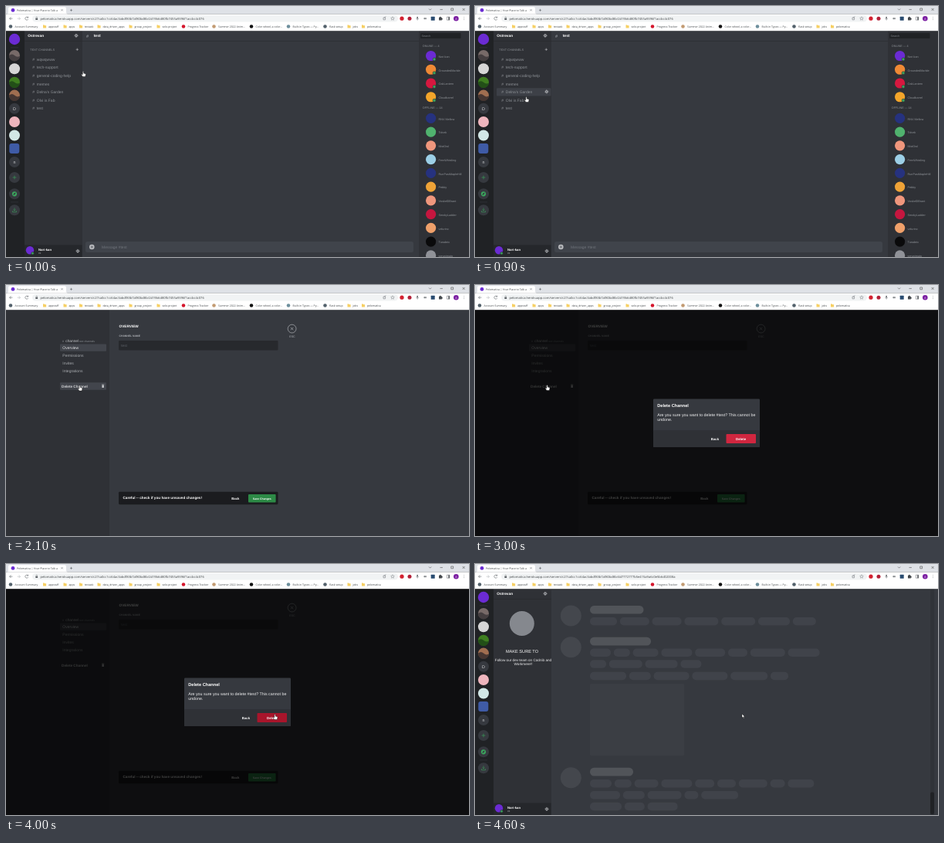
An HTML page that plays this animation: 600x325 px, repeating every 4.7 s.

```html
<!DOCTYPE html>
<html lang="en">
<head>
<meta charset="utf-8">
<title>Channel removal</title>
<style>
html, body { margin: 0; width: 100%; height: 100%; overflow: hidden; background: #36393f; }
svg { display: block; width: 100vw; height: 100vh; }
text { font-family: "Liberation Sans", Arial, sans-serif; text-rendering: geometricPrecision; white-space: pre; }
.ui text { font-family: "Open Sans", "Noto Sans", sans-serif; }
</style>
</head>
<body>
<svg id="stage" viewBox="0 0 600 325" preserveAspectRatio="none"></svg>
<script>
const LOOP = 4700, STEP = 100;
const GREY = '#8e9297', SIDE = '#2f3136', MAIN = '#36393f', DARK = '#202225', GREEN = '#3ba55d';

// Markup helpers
const rect = (x, y, w, h, fill, r = 0, more = '') =>
  `<rect x="${x}" y="${y}" width="${w}" height="${h}" rx="${r}" fill="${fill}" ${more}/>`;
const dot = (x, y, r, fill, more = '') => `<circle cx="${x}" cy="${y}" r="${r}" fill="${fill}" ${more}/>`;
const text = (x, y, s, size, fill, more = '') =>
  `<text x="${x}" y="${y}" font-size="${size}" fill="${fill}" ${more}>${s}</text>`;
const line = (d, color, w = .6, more = '') =>
  `<path d="${d}" fill="none" stroke="${color}" stroke-width="${w}" ${more}/>`;
const group = (id, body, more = '') => `<g id="${id}" ${more}>${body}</g>`;
const BOLD = 'font-weight="700"', MID = 'text-anchor="middle"';
const gear = (x, y, color = '#c9cbce') =>
  dot(x, y, 1.25, 'none', `stroke="${color}" stroke-width=".9"`) +
  dot(x, y, 2, 'none', `stroke="${color}" stroke-width=".7" stroke-dasharray=".8 .77"`);
const plus = (x, y, r, color) => line(`M${x - r} ${y}h${2 * r}M${x} ${y - r}v${2 * r}`, color);

function browser() {
  const ink = '#5f6368', dim = '#3c4043';
  const folder = x => `<path d="M${x - 2} 24.6h1.6l.6.6h1.9v3.3h-4.1z" fill="#f6cf62"/>`;
  const marks = [
    [6, 'Account Summary', '#53616b'], [50, 'appstuff'], [76.5, 'apps'], [97, 'testask'],
    [120.5, 'data_driven_apps'], [161.5, 'group_project'], [197.5, 'solo-project'],
    [230, 'Progress Tracker', '#d5162c'], [269.5, 'Summer 2022 Anim...', '#c29b72'],
    [318, 'Color wheel, a color...', '#111'], [366, 'Built-in Types — Py...', '#6d8f9c'],
    [413.5, 'flask setup', '#53616b'], [444.5, 'jobs'], [463, 'pelomatica']
  ];
  let s = rect(0, 0, 600, 10.5, '#dee1e6') + rect(0, 10.5, 600, 21.7, '#fff') +
    `<path d="M1 10.6Q3 10.5 3 8V3.5Q3 1.3 5 1.3H76Q78 1.3 78 3.5V8Q78 10.5 80 10.6Z" fill="#fff"/>` +
    dot(9, 5.4, 2.4, '#6b2bd3') + text(14, 6.9, 'Pelomatica | Your Place to Talk a', 3.5, dim) +
    line('M71.4 4.2l2.3 2.3m0-2.3l-2.3 2.3', ink, .5) + plus(84.5, 5.4, 1.6, ink) +
    line('M548 3.6l1.6 1.6l1.6-1.6M562.5 4.6h3.4M576.8 3h2.8v2.8h-2.8zM591.6 3l3 3m0-3l-3 3', '#333', .5) +
    line('M8.4 16.2H4.6m1.8-1.8l-1.8 1.8l1.8 1.8', ink) +
    line('M14.7 16.2h3.8m-1.8-1.8l1.8 1.8l-1.8 1.8', '#b4b7ba') +
    line('M28.5 15a2 2 0 1 0 .2 2M28.7 13.7v1.5h-1.5', ink) +
    rect(34, 12, 474, 8.6, '#f1f3f4', 4.3) +
    rect(38.3, 15.8, 2.8, 2.3, ink, .3) + line('M38.9 15.8v-.9a.8.8 0 0 1 1.6 0v.9', ink, .4) +
    `<text id="url" x="44.5" y="17.8" font-size="4.07" fill="${dim}"></text>` +
    line('M489 15h2.6v2.8h-2.6zM490.2 15l2.2-1.3', ink, .5) +
    line('M501 13.8l.7 1.5l1.6.2l-1.2 1.1l.3 1.6l-1.4-.8l-1.4.8l.3-1.6l-1.2-1.1l1.6-.2z', ink, .4) +
    dot(513, 16.2, 2.6, '#d3202f') + dot(523, 16.2, 2.5, '#b32038') +
    rect(532.4, 13.8, 1.5, 3, ink, .7) + line('M531.7 16a1.4 1.4 0 0 0 2.9 0M533.2 17.5v1.2', ink, .4) +
    line('M541.3 16.2h3.7M542.3 15v2.4M544 15v2.4', ink, .7) +
    rect(550.7, 13.7, 5, 5, '#294b70', .5) +
    `<path d="M561 14.8h1.1a.8.8 0 1 1 1.5 0h1.2v1.2a.8.8 0 1 1 0 1.5v1.1H561z" fill="#43474b"/>` +
    line('M571.3 14.2h3.5v4h-3.5z', ink, .5) + rect(573.2, 14.2, 1.7, 4, ink) +
    dot(583.3, 16.2, 3.3, '#7b1fa2') + text(583.3, 17.5, 'A', 3.5, '#fff', MID) +
    [14.6, 16.2, 17.8].map(y => dot(593.5, y, .4, ink)).join('');
  for (const [x, name, color] of marks) {
    s += color ? dot(x, 26.5, 2.3, color) : folder(x);
    s += text(x + (color ? 5.6 : 4.9), 27.9, name, 3.48, dim);
  }
  return `<g class="ui">${s}</g>`;
}

function servers() {
  const pic = (y, sky, land) => dot(11, y, 7, sky) + `<path d="M4 ${y}q4-3 7 0t7 1a7 7 0 0 1-14-1z" fill="${land}"/>`;
  const tile = (y, label = '') => dot(11, y, 7, MAIN) + text(11, y + 1.9, label, 5.3, '#dcddde', MID);
  return rect(0, 32, 24, 293, DARK) + dot(11, 43, 7.2, '#6b2bd3') + rect(6, 53.6, 10, .6, '#3a3d43') +
    pic(64, '#776a68', '#443e40') + dot(11, 81.3, 7, '#d6d6d6') + pic(98.7, '#3f7e20', '#234f18') +
    pic(115.6, '#a06e50', '#463632') + tile(132.7, 'D') + dot(11, 150, 7, '#eeb5bd') +
    dot(11, 167.5, 7, '#d2e7e6') + rect(4.3, 178, 13, 13, '#3f5ba6', 3) + tile(202, 'n') +
    tile(222) + plus(11, 222, 2.4, GREEN) + tile(243.3) + dot(11, 243.3, 3.1, GREEN) +
    `<path d="M12.7 241.6l-1 2.5l-2.4 1l1-2.5z" fill="${MAIN}"/>` + rect(6, 253.7, 10, .5, '#3a3d43') +
    tile(264.3) + line('M11 261.4v3.7m-1.5-1.5l1.5 1.5l1.5-1.5M8.5 265.2v1.6h5v-1.6', GREEN, .6);
}

function frame() {
  return rect(24, 32, 75, 293, SIDE) + rect(24, 45, 75, .5, '#25272b') +
    text(28.3, 39.7, 'Ostrevan', 4.8, '#fff', BOLD) + gear(91, 38.3) +
    rect(24, 309.5, 74.5, 15.5, '#25272b') + dot(31, 316.2, 5.2, '#6b2bd3') +
    dot(34.5, 320.2, 1.7, GREEN, 'stroke="#25272b" stroke-width=".6"') +
    text(42, 316.6, 'Nori-kan', 4.2, '#fff', BOLD) + text(42, 321.2, '#1', 3.1, '#b9bbbe') + gear(93, 317.3);
}

const rowY = i => 69 + 10.6 * i;
function channels() {
  const names = ['wqwqwww', 'tech-support', 'general-coding-help', 'memes', "Delna's Garden", 'Olvi is Fab', 'test'];
  return text(31.3, 58, 'TEXT CHANNELS', 3.85, GREY) + plus(92.3, 56.3, 1.7, '#b9bbbe') +
    names.map((name, i) => group('row' + i,
      group('hover' + i, rect(28, rowY(i) - 5.1, 70.4, 10.2, '#3d4047', 1.2) + gear(92.8, rowY(i) - .5)) +
      text(34.2, rowY(i) + 1.8, '#', 5, GREY) + text(39.8, rowY(i) + 1.8, name, 5, GREY))).join('');
}

function members() {
  const online = ['Nori-kan', '#6b2bd3', 'GroundedMarble', '#ef8935', 'OakLantern', '#d6183f', 'Cloudbarrel', '#f3a52a'];
  const away = ['RNV Mellow', '#26327f', 'Tolvek', '#50b26e', 'MistOwl', '#ef967c', 'FernWhistling', '#9ccfe6',
    'RunPastMapleHill', '#26327f', 'Pebby', '#efa337', 'VoskelDBrant', '#ef967c', 'SmokyLadder', '#c5163f',
    'velurino', '#efa06a', 'Tunabrix', '#0a0a0b', 'serunimato', '#909298'];
  const list = (items, top, lit) => items.map((name, i) => {
    if (i % 2) return '';
    const y = top + i / 2 * 17.75;
    return dot(550.6, y, 6.6, items[i + 1]) +
      (lit ? dot(555, y + 4.5, 2, GREEN, `stroke="${SIDE}" stroke-width=".6"`) : '') +
      text(560.5, y + 2.3, name, 3.75, GREY);
  }).join('');
  return rect(535, 32, 65, 293, SIDE) + rect(537, 35, 52.5, 7, DARK, 1) + text(538.5, 39.9, 'Search', 3.7, '#777b81') +
    text(539.8, 53.3, 'ONLINE — 4', 3.75, GREY) + list(online, 64.5, true) +
    text(539.8, 133.4, 'OFFLINE — 14', 3.75, GREY) + list(away, 145.3, false);
}

function chat() {
  return rect(99, 32, 436, 293, MAIN) + rect(99, 45, 436, .6, '#292b2f') +
    text(104, 40.5, '#', 5.6, GREY, BOLD) + text(113.7, 40, 'test', 5, '#fff', BOLD) +
    rect(103, 305, 425, 14, '#40444b', 2.5) + dot(111.3, 312, 3.3, '#b9bbbe') + plus(111.3, 312, 1.8, '#40444b') +
    text(124, 313.7, 'Message #test', 5, '#6f747b') + channels() + members();
}

function home() {
  const pills = (y, widths, gap = 3.8) => {
    let x = 149, s = '';
    for (const w of widths) { s += rect(x, y, w, 10.5, '#40434a', 5); x += w + gap; }
    return s;
  };
  const post = (y, w) => dot(124.3, y + 13, 13.5, '#44474d') + rect(149, y, w, 10.6, '#515459', 5.2);
  return rect(99, 32, 501, 293, MAIN) + rect(99, 32, 491, 2, '#303338') +
    rect(590, 32, 5.2, 293, '#303338') + rect(590, 295.5, 5, 28.5, DARK, 2) +
    dot(60.8, 77, 16, '#85888e') + text(61, 114.6, 'MAKE SURE TO', 5.6, '#fff', MID) +
    text(62.5, 126.1, 'Follow our dev team on Codnib and', 4.65, '#f1f1f2', MID) +
    text(62.5, 131.3, 'Workmere!!', 4.65, '#f1f1f2', MID) +
    post(54, 69.5) + pills(69, [35, 38, 38, 44, 44, 41, 30]) +
    post(94.8, 79) + pills(109.5, [27, 21, 33, 40, 39, 25, 45, 41]) +
    pills(124.3, [21, 43, 42, 27]) + pills(139.8, [47, 28, 46, 46, 48, 23]) +
    rect(149, 155, 122, 93, '#3b3e44', 1.5) +
    post(263.8, 56) + pills(279, [28, 22, 31, 40, 25, 24, 37, 19, 34]) +
    pills(294, [39, 28, 44, 18, 48]) + pills(308.8, [41, 26, 39]);
}

function settings() {
  const tabs = ['Overview', 'Permissions', 'Invites', 'Integrations'];
  return rect(0, 32, 134, 293, SIDE) + rect(134, 32, 466, 293, MAIN) +
    text(73, 73.8, '#', 3.7, GREY) + text(77.3, 74, 'channel', 4.8, '#c3c5c8') + text(95, 74, 'text channels', 3.4, GREY) +
    rect(70, 76.5, 60, 9.2, '#42454c', 1) +
    tabs.map((s, i) => text(73.3, 82.9 + 10 * i, s, 5, i ? '#a9acb0' : '#e4e5e6')).join('') +
    group('delHover', rect(70, 126.2, 60, 9.6, '#42454c', 1)) + text(72, 132.7, 'Delete Channel', 4.7, '#d4d5d7', BOLD) +
    rect(124.4, 129.6, 2.5, 3.4, '#c3c5c8', .3) + rect(124, 128.7, 3.3, .6, '#c3c5c8') +
    text(146.5, 55.3, 'OVERVIEW', 4.7, '#fff', BOLD) + text(146.5, 66.5, 'CHANNEL NAME', 3.4, '#b0b3b8', BOLD) +
    rect(146, 72, 206.5, 12.4, '#27292d', 1) + text(149.3, 79.8, 'test', 4.7, '#5e6268') +
    dot(370.6, 56.6, 5.4, 'none', 'stroke="#b0b3b8" stroke-width=".7"') +
    line('M369 55l3.2 3.2m0-3.2l-3.2 3.2', '#b0b3b8', .7) + text(371, 68.3, 'ESC', 3.7, '#b0b3b8', MID) +
    rect(146, 267.8, 206.5, 16.4, '#1b1c1f', 1.4) +
    text(151.5, 277.4, 'Careful -- check if you have unsaved changes!', 4.67, '#fff', BOLD) +
    text(292.2, 277.7, 'Back', 4.3, '#fff', BOLD) + rect(314, 271, 35.6, 10.5, '#2d8a46', 1) +
    text(331.8, 277.6, 'Save Changes', 3.5, '#fff', MID + ' ' + BOLD);
}

function modal() {
  return rect(0, 32, 600, 293, '#000', 0, 'opacity=".75"') + rect(231, 147.5, 138, 62.5, MAIN, 1.2) +
    rect(231, 188, 138, 22, SIDE, 1.2) + text(236.2, 157.8, 'Delete Channel', 5.65, '#fff', BOLD) +
    text(236.2, 169.7, 'Are you sure you want to delete #test? This cannot be', 5.33, '#f1f1f2') +
    text(236.2, 175.9, 'undone.', 5.33, '#f1f1f2') + text(305.8, 200.6, 'Back', 4.3, '#fff', BOLD) +
    `<rect id="confirm" x="325.5" y="193" width="38.5" height="12" rx="1"/>` +
    text(344.6, 200.6, 'Delete', 4.37, '#fff', MID + ' ' + BOLD);
}

const pointers = group('cursor',
  `<path id="hand" d="M-.7.5Q0-.4.7.5V2.6L3 3.2Q3.7 3.5 3.4 4.6L2.8 7H-.6L-2.3 4.4Q-2.4 3.4-1.4 3.8L-.7 4.4Z"/>` +
  `<path id="arrow" d="M0 0V5.1L1.2 4L2.1 6L2.9 5.6L2.1 3.7H3.7Z"/>`,
  'fill="#fff" stroke="#111" stroke-width=".45"');

document.getElementById('stage').innerHTML =
  group('app', servers() + frame() + group('chat', chat()) + group('home', home())) +
  group('settings', settings()) + group('modal', modal()) + browser() + pointers;

const el = id => document.getElementById(id);
const show = (id, on) => el(id).setAttribute('display', on ? 'inline' : 'none');

// Pointer stops: time, x, y
const stops = [[0, 100, 84.5], [600, 60, 66], [900, 66.5, 117.5], [1200, 72, 131.5], [1600, 96, 132], [1700, 96, 132],
  [2100, 95.5, 130], [2900, 95.5, 130], [3000, 93.5, 129.5], [3300, 93.5, 129.5], [3900, 348.5, 194.5],
  [4400, 348.5, 194.5], [4500, 346, 194], [LOOP, 346, 194]];
function pointer(t) {
  const i = Math.max(1, stops.findIndex(s => s[0] >= t));
  const [t0, x0, y0] = stops[i - 1], [t1, x1, y1] = stops[i];
  const f = Math.max(0, (t - t0) / (t1 - t0)), k = f * f * (3 - 2 * f);
  return [x0 + (x1 - x0) * k, y0 + (y1 - y0) * k];
}

const server = 'pelomatica.herokuapp.com/servers/c27ca0cc1cc64ac3abdf83b7af80bd8b/';
function render(time) {
  const t = Math.floor(time % LOOP / STEP) * STEP;
  const inSettings = t >= 1800 && t < 4500, atHome = t >= 4600;
  const [x, y] = pointer(t), [, lagY] = pointer(Math.max(0, t - 40));

  show('app', !inSettings);
  show('chat', !atHome);
  show('home', atHome);
  show('settings', inSettings);
  show('modal', inSettings && t >= 3000);
  show('delHover', t < 3000);
  show('row6', t < 4500);
  for (let i = 0; i < 7; i++) show('hover' + i, t < 1800 && x < 98 && Math.abs(lagY - rowY(i)) <= 5.3);
  el('confirm').setAttribute('fill', x > 325 ? '#a8152b' : '#d0263f');
  el('url').textContent = server + (atHome ? '4d7772777b5e415a9a6c0e5b6d02008a' : '2d19b6d80fb7455a9396f1accbc4c076');
  show('hand', t < 4500);
  show('arrow', t >= 4500);
  el('cursor').setAttribute('transform', `translate(${x} ${y})`);
}

const start = performance.now();
function tick() {
  render(performance.now() - start);
  requestAnimationFrame(tick);
}
tick();
</script>
</body>
</html>
```
